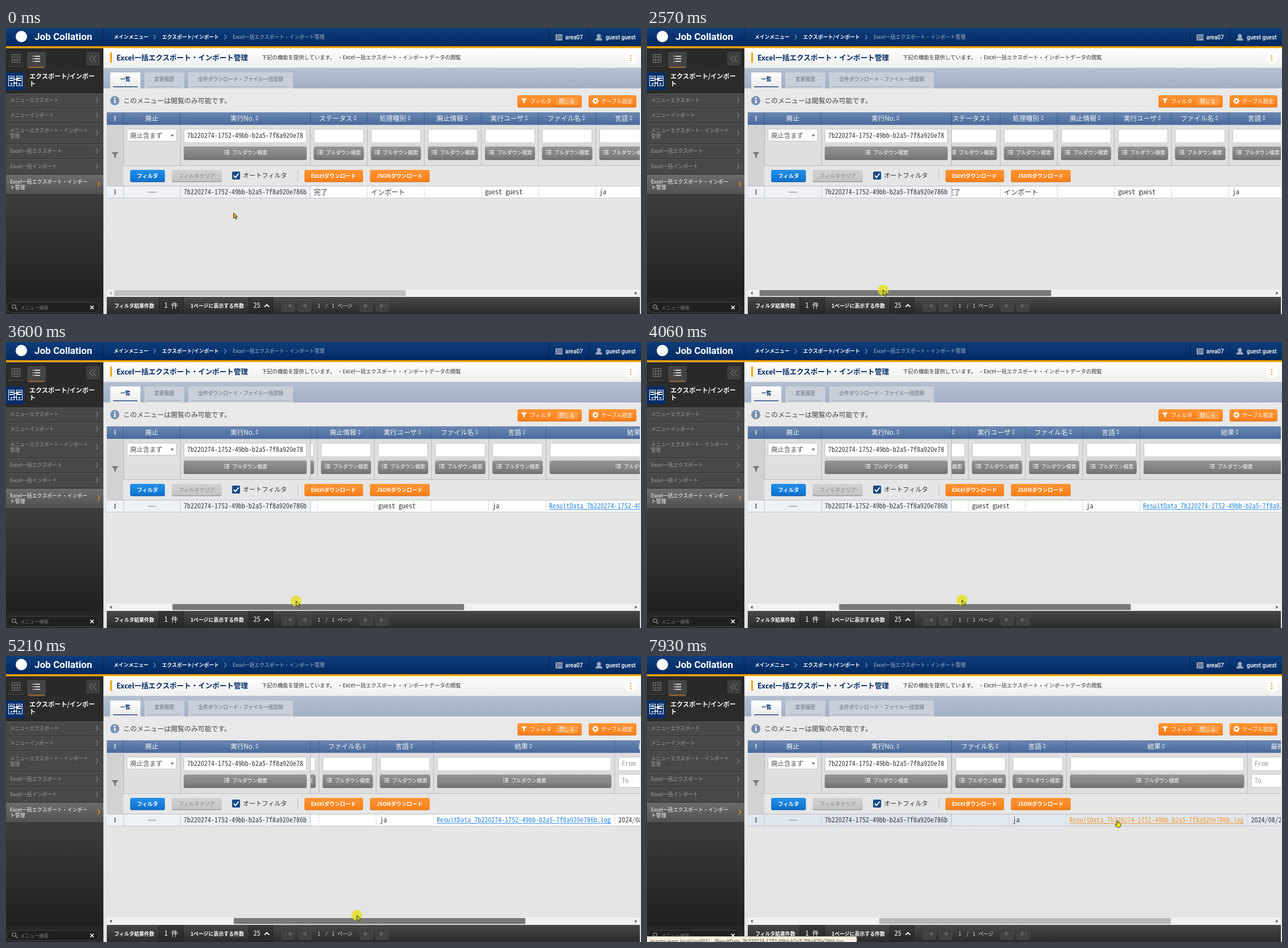
Animation of 1115 by 502 pixels, one loop 7.99 s. Source, as an HTML page:

```html
<!DOCTYPE html>
<html lang="ja">
<head>
<meta charset="utf-8">
<title>Export list</title>
<style>
html, body { margin: 0; width: 100%; height: 100%; overflow: hidden; background: #e4e4e4; }
svg { display: block; }
text { font-family: 'Noto Sans CJK JP', 'Noto Sans CJK', 'Noto Sans', sans-serif; white-space: pre; }
.ui { font-family: Roboto, 'Open Sans', sans-serif; }
.mono { font-family: 'Noto Sans Mono CJK JP', 'Liberation Mono', monospace; }
</style>
</head>
<body>
<svg id="stage" xmlns="http://www.w3.org/2000/svg" width="1115" height="502" viewBox="0 0 1115 502"></svg>
<script>
const LOOP = 7990;
const RUN_ID = '7b220274-1752-49bb-b2a5-7f8a920e786b';
const USER = 'guest guest';
const LOG = `ResultData_${RUN_ID}.log`;
const GRADIENTS = {
  top: ['#0f3d7c', '#00295f'], side: ['#3d3d3d', '#202020'], active: ['#6c6c6c', '#505050'],
  title: ['#ffffff', '#eeeeee'], tabs: ['#b5c0d1', '#a2afc4'], tab: ['#ffffff', '#e8e8e8'],
  body: ['#e9e9e9', '#e3e3e3'], head: ['#6a87b1', '#4b6b9c'], gray: ['#969696', '#777777'],
  pale: ['#d2d2d2', '#c4c4c4'], blue: ['#2490e9', '#0d72cd'], orange: ['#ff9535', '#fb801a'],
  foot: ['#484848', '#2b2b2b']
};

// The tabular font is sized so that one character fills a 6px cell.
const probe = document.createElement('canvas').getContext('2d');
probe.font = "12px 'Noto Sans Mono CJK JP', 'Liberation Mono', monospace";
const MONO = 72 / probe.measureText('0').width;

const rect = (x, y, w, h, fill, more = '') => {
  const paint = fill in GRADIENTS ? `url(#${fill})` : fill;
  return `<rect x="${x}" y="${y}" width="${w}" height="${h}" fill="${paint}" ${more}/>`;
};
const text = (x, y, str, size, fill, more = '') =>
  `<text x="${x}" y="${y}" font-size="${size}" fill="${fill}" ${more}>${str}</text>`;
const mono = (x, y, str, fill = '#3a3a3a', more = '') => text(x, y, str, MONO, fill, `class="mono" ${more}`);
const shape = (d, fill, more = '') => `<path d="${d}" fill="${fill}" ${more}/>`;
const line = (d, color, width = 1, more = '') => shape(d, 'none', `stroke="${color}" stroke-width="${width}" ${more}`);
const circle = (x, y, r, fill, more = '') => `<circle cx="${x}" cy="${y}" r="${r}" fill="${fill}" ${more}/>`;
const BOLD = 'font-weight="700"', MEDIUM = 'font-weight="500"', MID = 'text-anchor="middle"';

const chevron = (x, y, color, r = 3) => line(`M${x - r / 2} ${y - r * 1.4}l${r} ${r * 1.4}l${-r} ${r * 1.4}`, color, 1.2);
const dots = (x, y, color, gap = 3) => [-gap, 0, gap].map(d => rect(x - 1, y + d - 1, 2, 2, color)).join('');
const listIcon = (x, y, color, w = 6, gap = 3) => [-gap, 0, gap].map(d =>
  rect(x, y + d - .7, 1.6, 1.5, color) + rect(x + 3, y + d - .7, w, 1.5, color)).join('');
const funnel = (x, y, color, s = 1) =>
  shape(`M${x - 6 * s} ${y - 5 * s}h${12 * s}l${-4.5 * s} ${5 * s}v${5.5 * s}l${-3 * s} ${-2 * s}v${-3.5 * s}z`, color);
const input = (x, y, w, h = 24) => rect(x + .5, y + .5, w - 1, h - 1, '#fff', 'rx="2" stroke="#c2c2c2"');
const button = (x, y, w, h, fill, edge) =>
  rect(x, y + 1.5, w, h, edge, 'rx="3"') + rect(x, y, w, h, fill, 'rx="3"');

function pulldown(x, w) {
  const c = x + w / 2;
  return input(x, 177, w, 25) + line(`M${x} 205.5h${w}`, '#b4b4b4', 1, 'stroke-dasharray="2 1.5"') +
    button(x, 208, w, 22, 'gray', '#5e5e5e') + listIcon(c - 37, 218, '#eee') +
    text(c + 8, 222, 'プルダウン検索', 8.8, '#fff', `${MEDIUM} ${MID}`);
}

function headCell(x, w, label, width) {
  const c = x + w / 2 - 5.5, i = c + width / 2 + 5;
  const sort = width ? shape(`M${i - 3} 157l3 -4l3 4zM${i - 3} 159l3 4l3 -4z`, '#a5b9d5') : '';
  return rect(x, 148, w, 21, 'head') + line(`M${x + w - .5} 148v21`, '#3f608f') +
    text(width ? c : x + w / 2, 163, label, 11.7, '#f4f6fa', MID) + sort;
}

function header() {
  const person = circle(1041, 14, 3.6, '#9aa9bf') + shape('M1035 22q0 -5 6 -5t6 5z', '#9aa9bf');
  return rect(0, 0, 1115, 33, 'top') + rect(0, 32, 1115, 3.5, '#f7a200') +
    line('M170.5 0v32M953.5 0v32M1023.5 0v32', '#062350') +
    circle(27, 15, 10, '#fff') + text(50, 21, 'Job Collation', 17, '#fff', `class="ui" ${BOLD}`) +
    text(189, 19, 'メインメニュー', 8.8, '#fff', BOLD) + chevron(261, 16, '#8b9dbb') +
    text(274, 19, 'エクスポート/インポート', 8.8, '#fff', BOLD) + chevron(385, 16, '#8b9dbb') +
    text(398, 19, 'Excel一括エクスポート・インポート管理', 8.8, '#a9b8cf') +
    rect(965, 11, 12, 11, '#8e9db5') + line('M968.5 12v9M970 14.5h6M970 17.5h6', '#1b3d70') +
    text(982, 20, 'area07', 10, '#fff', `class="ui" ${MEDIUM}`) + person +
    text(1053, 20, USER, 10, '#fff', `class="ui" ${MEDIUM}`);
}

function sidebar() {
  const items = [
    [115, 26, 'メニューエクスポート'], [141, 26, 'メニューインポート'],
    [167, 37, 'メニューエクスポート・インポート', '管理'],
    [204, 26, 'Excel一括エクスポート'], [230, 27, 'Excel一括インポート'],
    [257, 36, 'Excel一括エクスポート・インポー', 'ト管理']
  ];
  let s = rect(0, 293, 171, 180, 'side') + rect(0, 35.5, 171, 35.5, '#292929') +
    rect(2, 41, 32, 27, '#2e2e2e') + rect(37, 42, 33, 29, '#444', 'rx="3"') + rect(40, 68, 27, 1.5, '#b5702a') +
    rect(3, 67, 28, 1, '#4a4a4a') + rect(141, 42, 24, 24, '#3e3e3e', 'rx="2"') +
    line('M152 48l-5 6l5 6M158 48l-5 6l5 6', '#8d8d8d') +
    rect(10.5, 46.5, 14, 14, 'none', 'stroke="#777"') + line('M15 47v13M20 47v13M11 51h13M11 56h13', '#777') +
    listIcon(47, 54, '#fff', 10, 4.5) + rect(0, 71, 171, 44, '#2b2b2b') + rect(0, 78, 32, 31, '#002f6c');
  for (const x of [4, 18]) s += rect(x + .5, 84.5, 10, 17, '#002f6c', 'stroke="#fff"') +
    rect(x + 2, 87, 7, 2, '#fff') + rect(x + 2, 91, 7, 2, '#fff') + circle(x + 5.5, 98, 1.5, '#fff');
  s += line('M13 90h8m-2 -2l2 2l-2 2M20 97h-8', '#fff', 1.4) +
    text(41, 89, 'エクスポート/インポー', 11.1, '#fff', BOLD) + text(41, 102, 'ト', 11.1, '#fff', BOLD);
  items.forEach(([y, h, a, b], i) => {
    const on = i === 5, mid = y + h / 2, color = on ? '#fff' : '#a0a0a0', size = a[0] === 'E' ? 8.9 : 8.6;
    s += rect(0, y, 171, h, on ? 'active' : '#484848') + rect(0, y, 171, 1, '#5c5c5c') + rect(0, y + h - 1, 171, 1, '#2f2f2f') +
      text(7, b ? mid - 2.5 : mid + 2, a, size, color) + (b ? text(7, mid + 7.5, b, size, color) : '') +
      chevron(160 + 3 * on, mid - 1, on ? '#f7a200' : '#858585', 3.4);
  });
  return s + rect(0, 473, 171, 29, '#262626') + rect(1.5, 481.5, 162, 18, '#202020', 'rx="9" stroke="#444"') +
    circle(14, 489, 3.2, 'none', 'stroke="#8a8a8a" stroke-width="1.3"') + line('M16.5 491.5l3.5 3.5', '#8a8a8a', 1.5) +
    text(25, 494, 'メニュー検索', 8.3, '#7c7c7c') + line('M148 487.5l6 6m0 -6l-6 6', '#fff', 1.6);
}

function pageTop() {
  const tab = (x, w, label) => rect(x, 78, w, 28, '#c9cfd9', 'rx="2"') + rect(x + 5, 102.5, w - 11, 1, '#9aa8be') +
    text(x + w / 2, 93, label, 8.8, '#858d9b', `${BOLD} ${MID}`);
  let gear = circle(1035, 128, 3.2, 'none', 'stroke="#fff" stroke-width="2.2"');
  for (let a = 0; a < 360; a += 45) gear += rect(1034, 122.5, 2, 2.5, '#fff', `transform="rotate(${a} 1035 128)"`);
  return rect(171, 35.5, 944, 35, 'title') + rect(183, 43, 3, 18, '#f7a200') +
    text(194, 56.5, 'Excel一括エクスポート・インポート管理', 12.5, '#002b62', BOLD) +
    text(449, 55, '下記の機能を提供しています。', 9.3, '#333') +
    text(582, 55, '・Excel一括エクスポート・インポートデータの閲覧', 9.3, '#333') +
    circle(1097, 53, 10, '#fff') + dots(1097, 53, '#f08a1c', 4) +
    rect(171, 70, 944, 36, 'tabs') + rect(183, 78, 53, 29, 'tab', 'rx="2"') + rect(188, 102.5, 43, 1.5, '#24497f') +
    text(209.5, 93, '一覧', 8.8, '#002b62', `${BOLD} ${MID}`) + tab(243, 70, '変更履歴') +
    tab(320, 184, '全件ダウンロード・ファイル一括登録') + rect(171, 106, 944, 396, 'body') +
    circle(191, 127.5, 8, '#7890b0') + rect(190, 126, 2.4, 6, '#fff') + circle(191, 123.5, 1.4, '#fff') +
    text(206, 132, 'このメニューは閲覧のみ可能です。', 11.9, '#444') +
    button(898, 118, 113, 20, 'orange', '#d9741c') + funnel(909.5, 128, '#fff', .85) +
    text(920, 131.5, 'フィルタ', 9.5, '#fff', MEDIUM) +
    rect(965.5, 120.5, 39, 15, '#ff9a40', 'rx="2" stroke="#f58a30"') + text(971, 131.5, '閉じる', 9.2, '#fff', MEDIUM) +
    button(1023, 118, 84, 20, 'orange', '#d9741c') + gear + text(1045, 131.5, 'テーブル設定', 9.3, '#fff', MEDIUM);
}

// Columns that move under the fixed ones: x, width, label, label width, cell.
const COLUMNS = [
  [534.5, 100.2, 'ステータス', 58, '完了'], [634.7, 100.2, '処理種別', 47, 'インポート'],
  [734.9, 100.2, '廃止情報', 47], [835.1, 100.2, '実行ユーザ', 58, USER],
  [935.3, 100.6, 'ファイル名', 58], [1035.9, 100.6, '言語', 23, 'ja'],
  [1136.5, 318, '結果', 23], [1454.5, 162, '最終更新日時', 71, '2024/08/20 14:05:32']
];

function movingColumn([x, w, label, width, cell], i) {
  const last = i === 7, dash = 'stroke-dasharray="3 2"';
  const field = last
    ? input(x + 6, 177, 88, 25) + input(x + 6, 207, 88, 24) + mono(x + 12, 193, 'From', '#999') + mono(x + 12, 223, 'To', '#999')
    : pulldown(x + 6, w - 12.5);
  const latin = /^[\x20-\x7e]*$/.test(cell);
  return headCell(x, w, label, width) + field + line(`M${x + w - .5} 171v70`, '#b9b9b9') +
    line(`M${x + w - .5} 278v20`, '#c4c4c4', 1, dash) +
    (cell ? latin ? mono(x + 6, 292, cell) : text(x + 6, 292.5, cell, 12, '#3a3a3a') : '');
}

function table() {
  const link = `<g id="link" fill="#2b86dd">${mono(1141.5, 292, LOG, 'inherit')}${rect(1141.5, 293.5, 306, 1, 'inherit')}</g>`;
  return rect(177, 148, 936, 24, '#4f70a2') + rect(177, 170, 936, 2, '#cfd3da') +
    rect(177, 171.5, 936, 106, '#dfdfdf') +
    rect(177, 278, 936, 20, '#fff', 'id="row"') +
    `<svg x="534.5" y="148" width="578.5" height="151" viewBox="534.5 148 578.5 151"><g id="moving">${COLUMNS.map(movingColumn).join('')}${link}</g></svg>` +
    rect(177, 171.5, 29, 106, '#d2d2d2') + headCell(177, 29, '', 0) + dots(191.5, 158.5, '#fff') +
    headCell(206, 100, '廃止', 0) + headCell(306, 229, '実行No.', 41) +
    funnel(191.5, 223, '#777') + line('M206.5 171v107M306.5 171v70M534.5 171v70', '#b4b4b4') +
    input(212, 177, 88, 22) + text(218, 193, '廃止含まず', 11.3, '#555') + shape('M289 187h6l-3 4z', '#777') +
    pulldown(312, 216) + mono(318, 193, RUN_ID.slice(0, 34)) +
    rect(206, 241, 907, 36.5, '#e6e6e6') + line('M206 241.5h907M177 277.5h936', '#bdbdbd') +
    button(218, 249, 61, 20, 'blue', '#0c5fb0') + text(248.5, 262.5, 'フィルタ', 9.3, '#fff', `${BOLD} ${MID}`) +
    button(291, 249, 88, 20, 'pale', '#9c9c9c') + text(335, 262.5, 'フィルタクリア', 9.2, '#858585', MID) +
    rect(397, 252, 14, 14, '#174982', 'rx="2"') + line('M400 259l3 3.5l5.5 -7', '#fff', 2) +
    text(416, 263, 'オートフィルタ', 11.1, '#333') + line('M512.5 249v20', '#bbb') +
    button(524, 249, 103, 20, 'orange', '#d9741c') + text(575, 262.5, 'Excelダウンロード', 9.3, '#fff', `${BOLD} ${MID}`) +
    button(639, 249, 105, 20, 'orange', '#d9741c') + text(691, 262.5, 'JSONダウンロード', 9.3, '#fff', `${BOLD} ${MID}`) +
    rect(177, 278, 357.5, 20, '#eef2f7', 'id="fixed"') + dots(191.5, 288, '#333') +
    rect(249, 287.5, 15, 1.5, '#a2a2a2') + mono(312, 292, RUN_ID) +
    line('M206.5 278v20M306.5 278v20M534.5 278v20', '#c3c8cf') + line('M177 298.5h936', '#c4c4c4');
}

function footer() {
  const nav = [[484, 'M491 484v7M501 484l-6 3.5l6 3.5z'], [513, 'M527 484l-6 3.5l6 3.5z'],
    [621, 'M629 484l6 3.5l-6 3.5z'], [649, 'M657 484l6 3.5l-6 3.5zM666 484v7']];
  return rect(177, 459, 936, 13, '#f1f1f1') + rect(190, 460, 512, 10.5, '#c1c1c1', 'id="thumb"') +
    shape('M185.5 462.5v6l-3.5 -3z', '#a3a3a3', 'id="left"') + shape('M1104.5 462.5v6l3.5 -3z', '#505050') +
    rect(177, 472, 936, 30, 'foot') + rect(268, 472, 43, 30, '#1d1d1d', 'opacity=".35"') +
    rect(426, 472, 42, 30, '#1d1d1d', 'opacity=".35"') + line('M268.5 472v30M311.5 472v30M426.5 472v30M468.5 472v30', '#222') +
    text(190, 490.5, 'フィルタ結果件数', 8.8, '#fff', BOLD) + mono(278, 491, '1', '#fff') + text(290, 491.5, '件', 12, '#fff') +
    text(324, 490.5, '1ページに表示する件数', 8.9, '#fff', BOLD) + mono(434.5, 491, '25', '#fff') + line('M454 489.5l4 -4l4 4', '#fff', 1.8) +
    nav.map(([x, d]) => rect(x + .5, 477.5, 22, 20, '#414141', 'rx="2" stroke="#4c4c4c"') +
      shape(d, '#616161', 'stroke="#616161"')).join('') +
    text(547, 490.5, '1', 8.8, '#ddd') + text(561, 490.5, '/', 8.8, '#ddd') + text(572, 490.5, '1', 8.8, '#ddd') + text(582, 490.5, 'ページ', 8.8, '#ddd');
}

function overlay() {
  return `<g id="status">${rect(-2, 492.5, 370, 12, '#f5f0df', 'rx="2" stroke="#cfc9b8"')}` +
    text(5, 503.5, `exastro-learn.local/org001/.../${LOG}`, 8.7, '#555', 'class="ui"') + '</g>' +
    circle(0, 0, 9.5, '#e4e01c', 'id="halo" opacity=".8"') +
    shape('M0 0V9.6L2.4 7.6L4.2 11.4L5.8 10.6L4.1 7.2L7.2 6.9Z', '#f0a020', 'id="arrow" stroke="#333"') +
    shape('M-1 1Q0 -1 1 1V4L5 5Q6 5.5 6 7V9Q5.5 12 3 12H-1L-4 8Q-4 6 -2.4 7L-1 8Z', '#eef000', 'id="hand" stroke="#333"');
}

const defs = Object.entries(GRADIENTS).map(([id, [a, b]]) =>
  `<linearGradient id="${id}" x2="0" y2="1"><stop stop-color="${a}"/><stop offset="1" stop-color="${b}"/></linearGradient>`).join('');
const stage = document.getElementById('stage');
stage.innerHTML = `<defs>${defs}</defs>` + header() + pageTop() + sidebar() + table() + footer() + overlay();
const part = {};
for (const id of ['row', 'fixed', 'moving', 'link', 'thumb', 'left', 'status', 'halo', 'arrow', 'hand'])
  part[id] = document.getElementById(id);

// time, x, y, eased
const POINTER = [
  [0, 399.5, 324.5], [990, 399.5, 324.5], [1660, 401, 459, 1], [2440, 401, 459], [2570, 414.5, 460],
  [3180, 469.5, 456], [4060, 553, 453], [4690, 600, 455], [5100, 614, 455], [5420, 620, 455],
  [6220, 620, 455], [7010, 826, 288.5, 1], [LOOP, 826, 288.5]
];
const THUMB = [
  [0, 0], [2440, 0], [2570, 7.5], [3180, 61], [4060, 147.3], [4690, 192.4], [5100, 207],
  [5420, 215.5], [5700, 215.5], [5790, 217.8], [LOOP, 217.8]
];
const SCROLL_RATIO = 1.835;
const ramp = (t, a, b) => Math.min(1, Math.max(0, (t - a) / (b - a)));

function track(keys, t) {
  const i = keys.findIndex(k => k[0] > t), a = keys[i - 1], b = keys[i];
  let u = ramp(t, a[0], b[0]);
  if (b[3]) u = u * u * (3 - 2 * u);
  return a.map((v, n) => v + (b[n] - v) * u);
}
const set = (el, name, value) => el.setAttribute(name, value);
const show = (el, on) => set(el, 'visibility', on ? 'visible' : 'hidden');

function draw(t) {
  const [, x, y] = track(POINTER, t), [, shift] = track(THUMB, t);
  const drag = t >= 2160 && t < 5760, press = t >= 7530 && t < 7860;
  const over = t > 6220 && y < 298, linked = t > 6220 && y < 295;
  const hover = Math.round(193 - 25 * ramp(t, 1790, 1880));
  const at = `translate(${x} ${y})`;

  set(part.moving, 'transform', `translate(${-shift * SCROLL_RATIO} 0)`);
  set(part.thumb, 'x', 190 + shift);
  set(part.thumb, 'fill', drag ? '#787878' : t < 2160 ? `rgb(${hover},${hover},${hover})` : '#b8b8b8');
  set(part.left, 'fill', shift ? '#505050' : '#a3a3a3');
  set(part.row, 'fill', over ? '#e2e8ef' : '#fff');
  set(part.fixed, 'fill', over ? '#dfe6ee' : '#eef2f7');
  set(part.link, 'fill', press ? '#e27a08' : linked ? '#f0962e' : '#2b86dd');
  set(part.status, 'opacity', ramp(t, 7190, 7370));
  for (const id of ['halo', 'arrow', 'hand']) set(part[id], 'transform', at);
  show(part.halo, drag || press);
  show(part.arrow, t < 7040);
  show(part.hand, t >= 7040);
  set(part.arrow, 'fill', t < 2160 ? '#f0a020' : '#d6e03c');
}

function frame() {
  draw(performance.now() % LOOP);
  requestAnimationFrame(frame);
}
frame();
</script>
</body>
</html>
```
